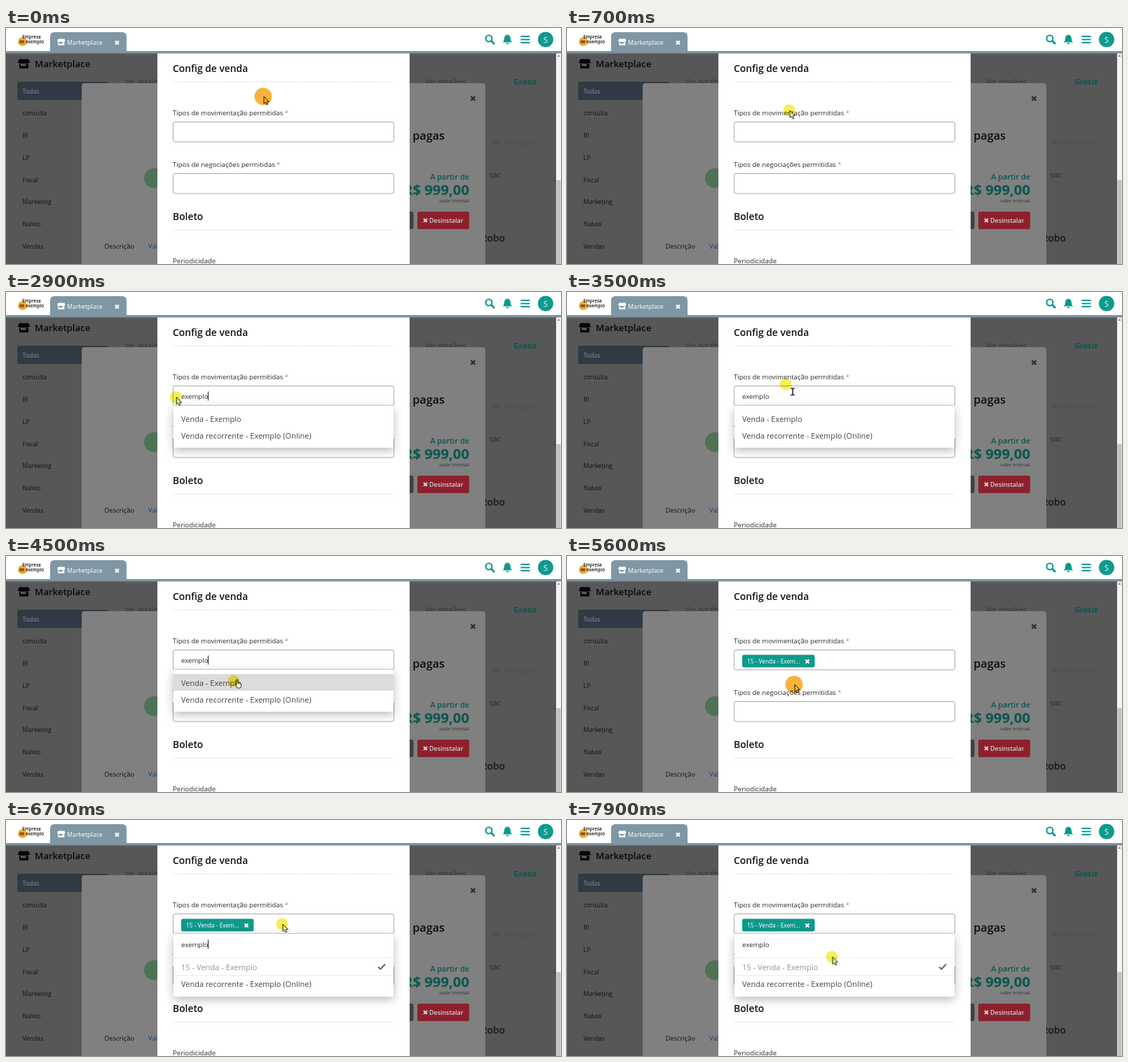
These frames come from a looping animation (792 by 338 pixels, 8000 ms). An HTML page:

```html
<!DOCTYPE html>
<html lang="pt-BR">
<head>
<meta charset="utf-8">
<title>Marketplace</title>
<style>
html, body { margin: 0; width: 100%; height: 100%; overflow: hidden; background: #fff; }
svg { display: block; width: 792px; height: 338px; }
text { font-family: "Open Sans", "Noto Sans", sans-serif; font-size: 9.6px; fill: #2b2b2b; white-space: pre; }
.semi { font-weight: 600; }
.bold { font-weight: 700; }
.head { font-size: 13.85px; font-weight: 600; fill: #111; }
.side text { font-size: 8.8px; fill: #111; }
.opt { font-size: 11px; fill: #444; }
.teal { fill: #0e9a8d; }
.dimteal { fill: #07564f; }
.star { fill: #c97b80; }
.field { fill: #fff; stroke: #a9a9a9; }
.rule { stroke: #dedede; stroke-dasharray: 2 1; }
.menu { fill: #fff; filter: drop-shadow(0 4px 7px rgba(0,0,0,.28)); }
.x { fill: none; stroke-width: 2; }
#halo { mix-blend-mode: multiply; }
</style>
</head>
<body>
<svg viewBox="0 0 792 338">
  <defs>
    <g id="store">
      <path d="M2 0H15L17 4.5Q16 6.5 14 6Q12 7 10.5 6Q8.500 7 6.500 6Q5 7 3 6Q.5 6.500 0 4.500Z"/>
      <path d="M2 7H4V10H11V7H13V13.500H2Z"/>
      <path d="M13 7H15V13.500H13Z"/>
    </g>
    <path id="cross" class="x" d="M-2.500 -2.500L2.500 2.500M2.500 -2.500L-2.500 2.500"/>
  </defs>

  <!-- dimmed page -->
  <rect width="792" height="338" fill="#575757"/>
  <use href="#store" x="17" y="44.500" fill="#080808"/>
  <text x="41" y="56" class="semi" style="font-size:13.2px;fill:#080808">Marketplace</text>
  <rect x="16" y="77" width="130" height="26" rx="2" fill="#303a44"/>
  <g id="side" class="side"></g>
  <text x="169" y="81" style="font-size:10px;fill:#29383c">Ver detalhes</text>
  <text x="598" y="81" style="font-size:10px;fill:#29383c">Ver detalhes</text>
  <text x="724" y="81" class="bold dimteal" style="font-size:11px">Grátis</text>
  <text x="694" y="167" style="font-size:9px;fill:#3f4b58">Ver de compra</text>
  <text x="706" y="214" text-anchor="end" style="font-size:11px;fill:#292929">sac</text>
  <text x="712" y="306" text-anchor="end" class="semi" style="font-size:13.800px;fill:#181818">Robo</text>

  <!-- dimmed product card -->
  <rect x="108" y="79" width="576" height="270" rx="4" fill="#808080"/>
  <use href="#cross" x="666.500" y="101" stroke="#2c2c2c" transform="translate(666.500 101) scale(1.2) translate(-666.500 -101)"/>
  <circle cx="211" cy="215" r="14" fill="#4c7355"/>
  <text x="140.500" y="316" style="font-size:9.4px;fill:#151515">Descrição</text>
  <text x="203" y="316" style="font-size:9.4px;fill:#173f80">Valores</text>
  <text x="626" y="160" text-anchor="end" class="semi" style="font-size:16.2px;fill:#0c0c0c">Contas pagas</text>
  <g text-anchor="end">
    <text x="661" y="217" class="semi dimteal" style="font-size:10.900px">A partir de</text>
    <text x="661" y="239" class="bold dimteal" style="font-size:20.300px">R$ 999,00</text>
    <text x="661" y="250" class="semi" style="font-size:6.9px;fill:#444">valor mensal</text>
  </g>
  <rect x="500" y="263" width="81.500" height="25" rx="2.500" fill="#3d4247"/>
  <rect x="587" y="263" width="74" height="25" rx="2.500" fill="#8d202d"/>
  <use href="#cross" x="598.500" y="275.500" stroke="#d5d5d5"/>
  <text x="604" y="279" class="semi" style="font-size:8.900px;fill:#d5d5d5">Desinstalar</text>

  <!-- dialog -->
  <rect x="216" y="30" width="360" height="308" fill="#fff"/>
  <text x="238" y="62.500" class="head">Config de venda</text>
  <path class="rule" d="M238.500 77H553.500M238.500 289.500H553.500"/>
  <text x="238" y="125">Tipos de movimentação permitidas <tspan class="star">*</tspan></text>
  <rect class="field" x="238.500" y="134.500" width="315" height="28.500" rx="2.500"/>
  <text x="238" y="199">Tipos de negociações permitidas <tspan class="star">*</tspan></text>
  <rect class="field" x="238.500" y="208.500" width="315" height="28.500" rx="2.500"/>
  <text x="238" y="274.500" class="head">Boleto</text>
  <text x="238" y="337">Periodicidade</text>

  <g id="chip">
    <rect x="250" y="141.500" width="103.500" height="18" rx="2.500" class="teal"/>
    <text x="257" y="153.500" style="font-size:8.3px;fill:#fff">15 - Venda - Exem...</text>
    <use href="#cross" x="343" y="151" stroke="#fff"/>
  </g>
  <g id="menu1">
    <path class="menu" d="M239 163H553V221Q553 223 551 223H241Q239 223 239 221Z"/>
    <rect id="hover" x="239" y="169" width="314" height="24" fill="#dcdcdc"/>
    <text x="250" y="185.500" class="opt">Venda - Exemplo</text>
    <text x="250" y="210" class="opt">Venda recorrente - Exemplo (Online)</text>
  </g>
  <g id="menu2">
    <path class="menu" d="M239 163H553V251Q553 253 551 253H241Q239 253 239 251Z"/>
    <path d="M239 197.500H553M239 222.500H553" stroke="#ececec"/>
    <text x="250" y="214.500" class="opt" style="font-size:11.1px;fill:#929292">15 - Venda - Exemplo</text>
    <path d="M531 210.500L534.500 213.500L541 206.500" fill="none" stroke="#5e6e72" stroke-width="2.200"/>
    <text x="250" y="239" class="opt">Venda recorrente - Exemplo (Online)</text>
  </g>
  <text id="typed" x="250"></text>
  <rect id="caret" width="1" height="13" fill="#222"/>

  <!-- scrollbar -->
  <rect x="785" y="36" width="7" height="302" fill="#f3f3f3"/>
  <rect x="785.500" y="218" width="6" height="120" fill="#c2c2c2"/>
  <path d="M786.500 41L788.500 38.500L790.500 41Z" fill="#777"/>

  <!-- header -->
  <rect width="792" height="34" fill="#fff"/>
  <rect y="33" width="792" height="3.500" fill="#7c939f"/>
  <path d="M63 34V12Q63 6 69 6H166Q172 6 172 12V34Z" fill="#7f97a4"/>
  <circle cx="23.500" cy="19.500" r="6.500" fill="#f6ad35"/>
  <g class="semi" text-anchor="middle" style="font-size:6.5px">
    <text x="36.500" y="14.500" style="font-size:6.3px;fill:#111">Empresa</text>
    <text x="36.500" y="22" style="font-size:6.3px;fill:#111">de exemplo</text>
  </g>
  <use href="#store" fill="#fff" transform="translate(73 15.500) scale(.69)"/>
  <text x="87" y="24" style="font-size:8.850px;fill:#fff">Marketplace</text>
  <use href="#cross" x="158.500" y="21" stroke="#fff"/>
  <circle cx="689" cy="15" r="4.500" fill="none" stroke="#0e9a8d" stroke-width="2.200"/>
  <path d="M692.500 18.500L697 23" stroke="#0e9a8d" stroke-width="2.800"/>
  <path class="teal" d="M715.500 9.500Q720 10.500 720 15Q720 18.500 722 20.500H709Q711 18.500 711 15Q711 10.500 715.500 9.500ZM713.500 21.500H717.500Q717 23.500 715.500 23.500Q714 23.500 713.500 21.500Z"/>
  <path d="M734.500 12H747.500M734.500 16.500H747.500M734.500 21H747.500" stroke="#0e9a8d" stroke-width="2"/>
  <circle cx="770" cy="16.500" r="11" class="teal"/>
  <text x="770" y="20.500" text-anchor="middle" style="font-size:11px;fill:#fff">S</text>

  <!-- pointer -->
  <g id="pointer">
    <path id="arrow" d="M1 0V10.500L3.300 8.300L5 12L6.800 11.200L5.200 7.700H8.400Z" fill="#fff" stroke="#111" stroke-width=".9"/>
    <path id="beam" d="M7 6H13M10 6V15.500M7 15.500H13" fill="none" stroke="#333" stroke-width="1.700"/>
    <path id="hand" d="M4 -2Q5.500 -3 6 -1V3L10 4Q11 4.500 10.700 7L9.500 10H5L2 5.500Q2.500 4 4 5.500Z" fill="#fff" stroke="#111" stroke-width=".9"/>
    <circle id="halo"/>
  </g>
</svg>
<script>
const LOOP = 8000, STEP = 100;
const $ = id => document.getElementById(id);
const show = (id, on) => $(id).style.display = on ? "" : "none";
const within = (t, spans) => spans.some(([a, b]) => t >= a && t < b);

["Todas", "consulta", "BI", "LP", "Fiscal", "Marketing", "Nalvio", "Vendas"].forEach((name, i) => {
  const item = document.createElementNS("http://www.w3.org/2000/svg", "text");
  item.setAttribute("x", 23.5);
  item.setAttribute("y", 93.5 + i * 31.75);
  if (!i) item.style.fill = "#87919a";
  item.textContent = name;
  $("side").append(item);
});

// time, x, y of the pointer
const path = [
  [0, 367, 98], [500, 367, 98], [1000, 225, 155], [2700, 225, 155],
  [3400, 312, 132], [3600, 312, 132], [3800, 345, 182], [4000, 345, 182],
  [4500, 325, 179], [4700, 324, 184], [5600, 324, 184], [6000, 394, 149],
  [7400, 394, 149], [7900, 378, 196]
];
const keyTimes = [1200, 1400, 1600, 1800, 1900, 2000, 2200];
const clicks = [[0, 300], [5300, 5700], [6000, 6200]];
const caretOn = [[1200, 2400], [2800, 3300], [3700, 4100], [4500, 5100],
  [6100, 6300], [6700, 7200], [7500, 7900]];

function place(t) {
  const i = path.findIndex(p => p[0] > t);
  if (i < 0) return path[path.length - 1].slice(1);
  const [t0, x0, y0] = path[i - 1], [t1, x1, y1] = path[i];
  const k = (t - t0) / (t1 - t0), e = k * k * (3 - 2 * k);
  return [x0 + (x1 - x0) * e, y0 + (y1 - y0) * e];
}

function draw(t) {
  const chosen = t >= 5400, menu1 = t >= 2700 && !chosen, menu2 = t >= 6100;
  show("chip", chosen);
  show("menu1", menu1);
  show("menu2", menu2);
  show("hover", t >= 4100);

  const typed = $("typed");
  typed.textContent = chosen && !menu2 ? "" : "exemplo".slice(0, keyTimes.filter(k => k <= t).length);
  typed.setAttribute("y", menu2 ? 182 : 152.5);
  $("caret").setAttribute("x", Math.floor(250 + typed.getComputedTextLength()));
  $("caret").setAttribute("y", menu2 ? 171.5 : 142.5);
  show("caret", within(t, caretOn));

  const [x, y] = place(t), click = within(t, clicks);
  const hand = t >= 3800 && !chosen;
  const beam = !hand && t >= 3100 && t < 3800;
  $("pointer").setAttribute("transform", `translate(${x} ${y})`);
  show("hand", hand);
  show("beam", beam);
  show("arrow", !hand && !beam);
  $("halo").setAttribute("r", click ? 12.5 : 8.5);
  $("halo").setAttribute("fill", click ? "#f8b33c" : "#f7ee55");
}

function tick() {
  draw(Math.floor(performance.now() % LOOP / STEP) * STEP);
  requestAnimationFrame(tick);
}
tick();
</script>
</body>
</html>
```
